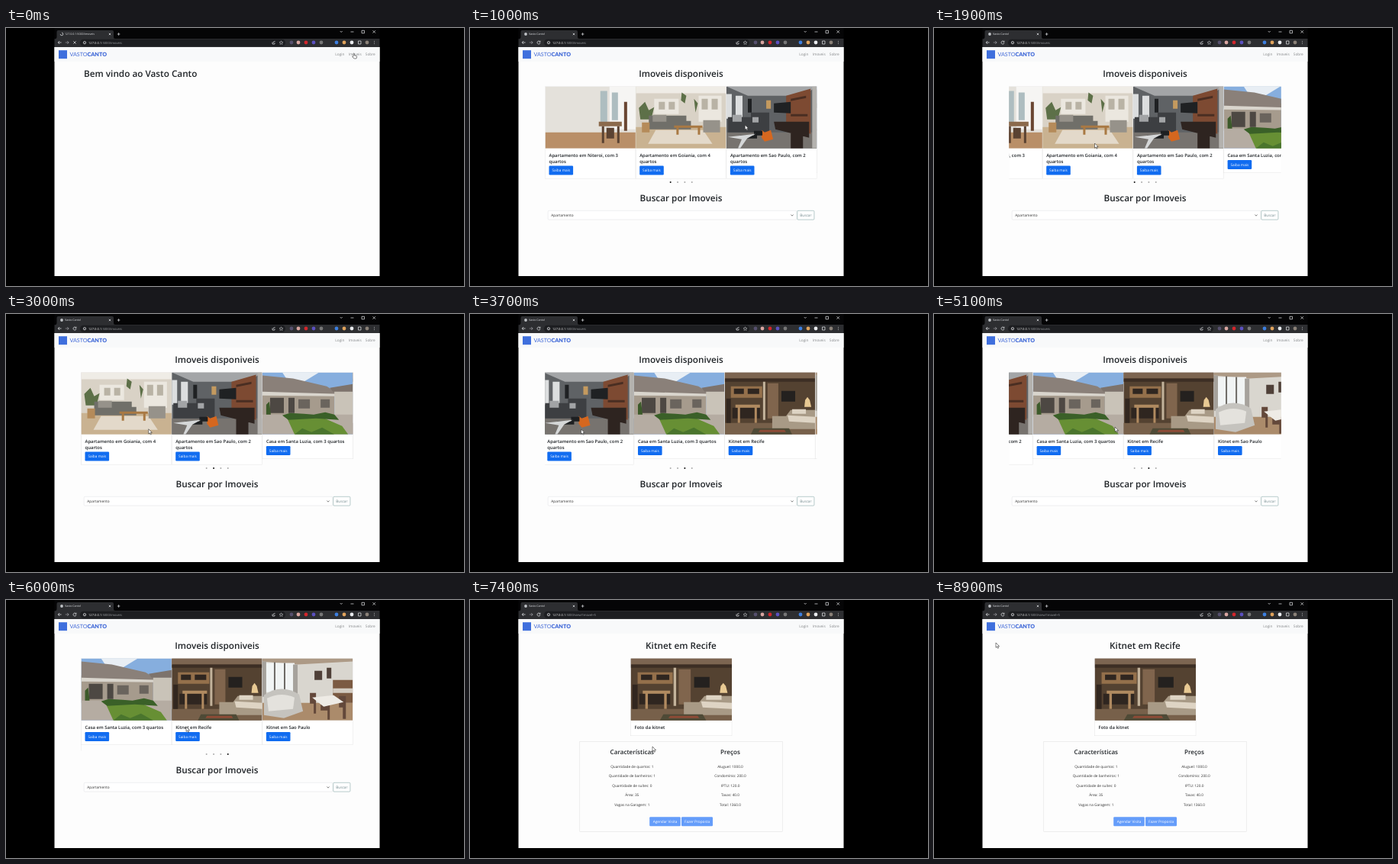
An HTML page that plays this animation: 600x338 px, repeating every 9 s.

```html
<!DOCTYPE html>
<html lang="pt">
<head>
<meta charset="utf-8">
<style>
html, body { margin: 0; width: 100%; height: 100%; overflow: hidden; background: #000 }
svg { display: block; width: 600px; height: 338px; font-family: "Open Sans", "Noto Sans", sans-serif }
text { white-space: pre; text-rendering: geometricPrecision }
.head { font-weight: 600; fill: #212529 }
.line { fill: none; stroke: #e8eaed; stroke-width: .7 }
</style>
</head>
<body>
<svg id="stage" viewBox="0 0 600 338"></svg>
<script>
const text = (x, y, size, str, attrs = '') =>
  `<text x="${x}" y="${y}" font-size="${size}" ${attrs}>${str}</text>`;
const mid = (x, y, size, str, attrs = 'fill="#333"') => text(x, y, size, str, `text-anchor="middle" ${attrs}`);
const rect = (x, y, w, h, fill, attrs = '') =>
  `<rect x="${x}" y="${y}" width="${w}" height="${h}" fill="${fill}" ${attrs}/>`;
const dot = (x, y, r, fill, attrs = '') => `<circle cx="${x}" cy="${y}" r="${r}" fill="${fill}" ${attrs}/>`;
const line = (d, attrs = '') => `<path class="line" d="${d}" ${attrs}/>`;
const heading = (x, y, size, str) => mid(x, y, size, str, 'class="head"');
const button = (x, y, w, label, fill = '#116cf0') =>
  rect(x, y, w, 12, fill, 'rx="1.2"') + mid(x + w / 2, y + 7.7, 4.75, label, 'fill="#fff"');

// Photos: flat shapes on a 118 x 81 field, as [fill, path] pairs
const photos = [
  ['#e4e1db', [
    ['#f6f5f3', 'M84 0H118V56H84Z'], ['#aebdc0', 'M72 6H81V48H72ZM87 8H95V44H87Z'],
    ['#b98f68', 'M0 60H118V81H0Z'], ['#8b6a4c', 'M70 46H100V52H70Z'],
    ['#6a4632', 'M103 20H107V58H103Z'], ['#5a4232', 'M74 52H77V74H74ZM94 52H97V74H94ZM80 54H90V68H80Z']]],
  ['#d9d2c6', [
    ['#efece6', 'M0 0H118V9H0Z'], ['#c9b291', 'M0 53H118V81H0Z'],
    ['#e3d9ca', 'M26 57H88L100 75H16Z'], ['#ebe7df', 'M24 16H56V36H24ZM82 12H112V46H82Z'],
    ['#b9b3a5', 'M30 20H38V30H30ZM43 20H51V30H43ZM86 16H94V30H86ZM99 16H107V30H99Z'],
    ['#5d7048', 'M4 28L12 20L17 31L24 27L20 43H6ZM60 8L66 12L64 22L59 18ZM76 16L81 22L78 34Z'],
    ['#706f69', 'M17 38H66V45H72V56H17Z'], ['#96928a', 'M22 37H40V46H22ZM88 44H110V60H88Z'],
    ['#a97943', 'M50 51H87V54H84V63H81V54H56V63H53V54H50Z'], ['#b58b5a', 'M8 47H18V60H8Z']]],
  ['#5f6265', [
    ['#a3a5a7', 'M0 0H118L100 12H28Z'], ['#dcdedf', 'M0 10H7V42H0ZM12 12H21V40H12Z'],
    ['#77736f', 'M0 60H118V81H0Z'], ['#7d4a32', 'M78 12L110 3V62L78 52Z'],
    ['#4a2e22', 'M84 16L104 12V15L84 19ZM84 36L106 36V39L84 39Z'],
    ['#1f2123', 'M62 22L84 20V35L62 34ZM28 16H33V34H28Z'], ['#3d3f42', 'M2 40H32V34H56V60H2Z'],
    ['#a2a4a6', 'M8 37H20V46H8ZM34 40H42V47H34Z'], ['#2e2420', 'M62 46H108V67L64 56ZM84 60H100V81H84Z'],
    ['#d5671f', 'M46 57L50 60L58 57L61 69L50 72L46 67Z'], ['#1d1f21', 'M36 58H47V64H36ZM18 64H40V68H18Z'],
    ['#d5d7d8', 'M2 66L38 62L27 68L18 81H15L20 69Z'], ['#b4b2ae', 'M112 0H118V81H112Z'],
    ['#c49a5f', 'M52 18H58V29H52Z']]],
  ['#86aede', [
    ['#e8eef4', 'M26 0H74L54 12H34Z'], ['#a69b8d', 'M0 22H94V58H0Z'],
    ['#8a8079', 'M0 4L40 8L84 18L100 28H0Z'], ['#d9d5cd', 'M0 25L100 28V31L0 30Z'],
    ['#4d4843', 'M10 33H28V53H10ZM34 33H42V53H34Z'], ['#6a645d', 'M47 35H62V47H47ZM76 35H88V46H76Z'],
    ['#c9c3b8', 'M94 24H118V60H94Z'], ['#7d736c', 'M88 20L118 15V25H92Z'],
    ['#b5aca2', 'M0 55H118V81H0Z'], ['#678f34', 'M32 59L72 56L104 70L112 81H42Z'],
    ['#3a6028', 'M26 56L36 53L54 54L67 55L82 52L94 55L100 62L70 60L34 62Z'],
    ['#4a752d', 'M42 81L52 73L64 78L78 72L94 81Z'], ['#3c5a2a', 'M5 42L9 38L11 55H5Z']]],
  ['#544231', [
    ['#7c6551', 'M0 0H118V8H0Z'], ['#3c2e24', 'M0 8H118V12H0Z'],
    ['#94704b', 'M8 18H49V33H8Z'], ['#2f2620', 'M12 21H25V28H12ZM30 21H45V28H30ZM10 46H46V60H10Z'],
    ['#b08a60', 'M14 42H46V46H42V66H39V46H20V66H17V46H14Z'], ['#c3b39b', 'M50 12H53V62H50Z'],
    ['#80654d', 'M56 14H70V60H56Z'], ['#24211f', 'M74 24H92V38H74Z'],
    ['#77604a', 'M0 66H118V81H0Z'], ['#e8c993', 'M105 36L108 32L111 36L113 45H104Z'],
    ['#a89a86', 'M62 57H80L86 49H118V74H62Z'], ['#ded4c4', 'M88 48H106V54H88ZM82 56L118 58V66L84 64Z'],
    ['#4e4a36', 'M38 73H84L88 81H34Z'], ['#8d4b36', 'M46 75L78 75L80 78H44Z'], ['#322720', 'M2 34H8V66H2Z']]],
  ['#d9d6cf', [
    ['#ad9a86', 'M0 0H118V4L46 8L0 4Z'], ['#f1f4f4', 'M4 6H42V44H4Z'],
    ['#6d6a66', 'M15 5H17V44H15ZM28 6H30V44H28Z'], ['#a6a29c', 'M0 4H5V50H0ZM40 8H46V46H40Z'],
    ['#ab8b6b', 'M0 58H118V81H0Z'], ['#7b5a42', 'M92 28H118V58H92Z'],
    ['#d3cbc0', 'M92 39H118V45H92Z'], ['#4f4038', 'M68 16H78V28H68ZM84 12H90V26H84Z'],
    ['#c5c3be', 'M2 48Q24 32 48 47L53 69L28 78L2 74Z'], ['#e4e2dd', 'M6 52Q24 43 42 51L40 66L8 69Z'],
    ['#63483a', 'M62 45H70V72H67V59H62ZM100 49H109V79H105V64H100ZM76 60H88V80H85V68H76Z'],
    ['#eeebe5', 'M65 51L93 48L106 57L80 63Z']]]
].map(([bg, shapes], i) =>
  `<symbol id="photo${i}" viewBox="0 0 118 81" preserveAspectRatio="none">${rect(0, 0, 118, 81, bg)}` +
  shapes.map(([fill, d]) => `<path fill="${fill}" d="${d}"/>`).join('') + '</symbol>').join('');
const photo = (i, x, y, w, h) => `<use href="#photo${i}" x="${x}" y="${y}" width="${w}" height="${h}"/>`;

const PITCH = 118.7, LEFT = 98.5;
const homes = [
  ['Apartamento em Niteroi, com 3', 'quartos'], ['Apartamento em Goiania, com 4', 'quartos'],
  ['Apartamento em Sao Paulo, com 2', 'quartos'], ['Casa em Santa Luzia, com 3 quartos'],
  ['Kitnet em Recife'], ['Kitnet em Sao Paulo']];
const cards = homes.map((lines, i) => {
  const x = LEFT + i * PITCH, extra = lines.length > 1 ? 7.5 : 0;
  return rect(x, 76.8, PITCH - .3, 113 + extra, '#fff', 'stroke="#dedede" stroke-width=".4"') +
    photo(i, x, 76.6, 118.4, 81.2) +
    lines.map((s, n) => text(x + 5, 169 + n * 7.5, 5.95, s, 'class="head"')).join('') +
    button(x + 5, 173 + extra, 31.6, 'Saiba mais');
}).join('');

const extensions = [[374, '#56506e'], [383, '#d9a5a0'], [393, '#d3262c'], [403, '#5b50c0'], [413, '#777'],
  [433, '#3c7fe0'], [443, '#e0a35c'], [453, '#e8eaed'], [473, '#8a8178']];
const browser = rect(63.5, 0, 426, 325, '#050506') +
  '<path fill="#2d2e31" d="M64 14.5Q66.500 14 66.500 12V5Q66.500 3 68.500 3H139Q141 3 141 5V12Q141 14 143 14H489.500V25H63.500V14Z"/>' +
  rect(97, 14.8, 269, 9, '#1d1e21', 'rx="4.500"') +
  line('M134.8 6.800L137.2 9.200M137.2 6.800L134.8 9.200M145.8 8H149.4M147.6 6.200V9.800M437.700 4L439.200 5.500L440.700 4M451.500 5H455.500M466 3.300H469.500V6.800H466ZM480.500 3.200L484 6.700M484 3.200L480.500 6.700') +
  line('M72.600 19H68.200L70.200 17M68.200 19L70.200 21') +
  line('M77.800 19H82.200L80.200 17M82.200 19L80.200 21', 'opacity=".6"') +
  dot(103, 19.2, 1.7, 'none', 'class="line"') + line('M103 18.800V20.300', 'opacity=".8"') +
  line('M349 18.500V21H352V19.500M350 19.500Q350 17.500 352.500 17.500') +
  line('M360.500 16.800L361.200 18.500L363 18.600L361.600 19.800L362 21.500L360.500 20.500L359 21.500L359.400 19.800L358 18.600L359.800 18.500Z', 'style="stroke-width:.45"') +
  extensions.map(([x, fill]) => dot(x, 19, 2.4, fill)).join('') +
  line('M461.500 17H465V21H461.500Z') +
  [17.3, 19, 20.7].map(y => dot(482.5, y, .45, '#e8eaed')).join('');

const nav = rect(63.5, 25, 426, 300, '#fdfdfd') + rect(63.5, 25, 426, 19, '#f8f9fa') +
  rect(69, 29.2, 11, 11, '#3f6fdd') +
  `<text x="83.500" y="37.400" font-size="7.200" fill="#3f68d8" font-family="Lato, sans-serif">VASTO<tspan font-weight="900">CANTO</tspan></text>` +
  [['Login', 431.3], ['Imoveis', 448.7], ['Sobre', 470.8]]
    .map(([s, x]) => text(x, 36.2, 4.75, s, 'fill="#858789"')).join('');

const welcome = text(102, 63.9, 11.75, 'Bem vindo ao Vasto Canto', 'class="head"');
const listing = heading(276.5, 63.9, 11.75, 'Imoveis disponiveis') +
  `<g clip-path="url(#window)"><g id="track">${cards}</g></g>` +
  [0, 1, 2, 3].map(i => dot(262.7 + i * 9.35, 202, 1, '#aaa', 'class="page"')).join('') +
  heading(276.5, 227.2, 11.75, 'Buscar por Imoveis') +
  rect(102.2, 239.3, 326, 11.8, '#fff', 'rx="1.2" stroke="#d3d7db" stroke-width=".4"') +
  text(106.3, 247, 4.75, 'Apartamento', 'fill="#333"') +
  line('M420.400 244.500L422 246.200L423.600 244.500', 'style="stroke:#444"') +
  rect(428.7, 239.3, 22.2, 11.8, '#fff', 'rx="1.2" stroke="#6f9696" stroke-width=".5"') +
  mid(439.8, 247, 4.75, 'Buscar', 'fill="#6b8387"');

const facts = (x, rows) => rows.map((s, i) => mid(x, 219.5 + i * 12.5, 4.73, s)).join('');
const detail = heading(276.5, 63.7, 11.75, 'Kitnet em Recife') +
  rect(210.6, 76.8, 132.4, 101, '#fff', 'stroke="#dedede" stroke-width=".4"') +
  photo(4, 210.6, 76.6, 132.4, 81.2) + text(215.5, 169, 5.95, 'Foto da kitnet', 'class="head"') +
  rect(143.8, 185.6, 265.4, 118, 'none', 'stroke="#dedede" stroke-width=".5"') +
  heading(212.3, 202, 8.1, 'Características') + heading(341, 202, 8.1, 'Preços') +
  facts(212.3, ['Quantidade de quartos: 1', 'Quantidade de banheiros: 1', 'Quantidade de suítes: 0', 'Área: 35', 'Vagas na Garagem: 1']) +
  facts(341, ['Aluguel: 1000.0', 'Condomínio: 200.0', 'IPTU: 120.0', 'Taxas: 40.0', 'Total: 1360.0']) +
  button(235.2, 284.3, 40.6, 'Agendar Visita', '#659dfa') + button(277, 284.3, 41, 'Fazer Proposta', '#659dfa');

const stage = document.getElementById('stage');
stage.innerHTML = `<defs>${photos}<clipPath id="window">${rect(98.2, 76, 356.6, 123, '#000')}</clipPath></defs>` +
  browser +
  text(77, 9.4, 3.65, '', 'id="title" fill="#e0e2e5"') +
  '<text x="108" y="20.700" font-size="4.100" fill="#f1f1f1">127.0.0.1<tspan id="path" fill="#9a9da1"></tspan></text>' +
  `<g id="busy">${line('M73 6.200A1.800 1.800 0 1 1 71.200 8', 'id="spin"')}${line('M88.300 17.300L91.700 20.700M91.700 17.300L88.300 20.700')}</g>` +
  `<g id="idle">${dot(73, 8, 1.9, '#bfc2c6')}${line('M91.600 17.800A2 2 0 1 0 92 19.500M92 16.700V18.300H90.400')}</g>` +
  nav + [welcome, listing, detail].map(s => `<g class="view">${s}</g>`).join('') +
  `<g id="cursor" stroke="#222" stroke-width=".55" fill="#fff" stroke-linejoin="round">
    <path d="M0 0V6.300L1.500 5L2.500 7.300L3.600 6.800L2.600 4.600H4.600Z"/>
    <path d="M0 .6Q.7 -.3 1.300 .6V3L4.200 3.600Q4.700 3.800 4.600 4.600L4 7H.8L-1.300 4.500Q-1 3.600 0 4.400Z"/></g>`;

const el = Object.fromEntries(['track', 'title', 'path', 'busy', 'idle', 'spin', 'cursor']
  .map(id => [id, document.getElementById(id)]));
const views = [...document.querySelectorAll('.view')], pages = [...document.querySelectorAll('.page')];
const show = (node, on) => node.setAttribute('display', on ? 'inline' : 'none');

// Keys are [time, values...], joined linearly
const pointer = [[0, 455, 33], [400, 407, 110], [600, 400, 113], [800, 385, 120], [1600, 286, 148],
  [1900, 210.5, 151], [2200, 160, 151], [2900, 160, 151], [3300, 267, 150], [3700, 145.5, 151],
  [3900, 147, 151], [4100, 169, 150], [4300, 169, 150], [4500, 419, 130], [4800, 324, 146],
  [5100, 237, 148], [5300, 206, 152], [5600, 212, 160], [5800, 236, 165], [6000, 236, 166],
  [6200, 238, 178], [6500, 238, 180], [7000, 239, 192], [7900, 239, 192], [8300, 236, 181],
  [8400, 236, 181], [8500, 81, 56], [9000, 81, 56]];
const scroll = [[0, 0], [1600, 0], [1900, 75], [2200, 126], [2300, 126], [2500, PITCH], [3300, PITCH],
  [3700, 239.6], [3900, 239.6], [4100, 2 * PITCH], [4800, 2 * PITCH], [5100, 325], [5300, 3 * PITCH], [9000, 3 * PITCH]];
function at(keys, t) {
  const i = keys.findIndex(k => k[0] > t), a = keys[i - 1], b = keys[i];
  return a.slice(1).map((v, n) => v + (b[n + 1] - v) * (t - a[0]) / (b[0] - a[0]));
}

function frame(now) {
  const t = Math.floor(now % 9000 / 100) * 100;
  const view = t < 800 ? 0 : t < 6400 ? 1 : 2;
  views.forEach((v, i) => show(v, i === view));
  show(el.busy, view === 0);
  show(el.idle, view > 0);
  el.spin.setAttribute('transform', `rotate(${t * .9} 73 8)`);
  el.title.textContent = view ? 'Vasto Canto!' : '127.0.0.1:5000/imoveis';
  el.path.textContent = view < 2 ? ':5000/imoveis' : ':5000/view?imovel=5';

  const [offset] = at(scroll, t), current = Math.floor(offset / PITCH + .001);
  el.track.setAttribute('transform', `translate(${-offset})`);
  pages.forEach((p, i) => p.setAttribute('fill', i === current ? '#111' : '#aaa'));

  const hand = t < 100 || t >= 6200 && t < 6500;
  el.cursor.setAttribute('transform', `translate(${at(pointer, t)})`);
  show(el.cursor.children[0], !hand);
  show(el.cursor.children[1], hand);
  requestAnimationFrame(frame);
}
requestAnimationFrame(frame);
</script>
</body>
</html>
```
